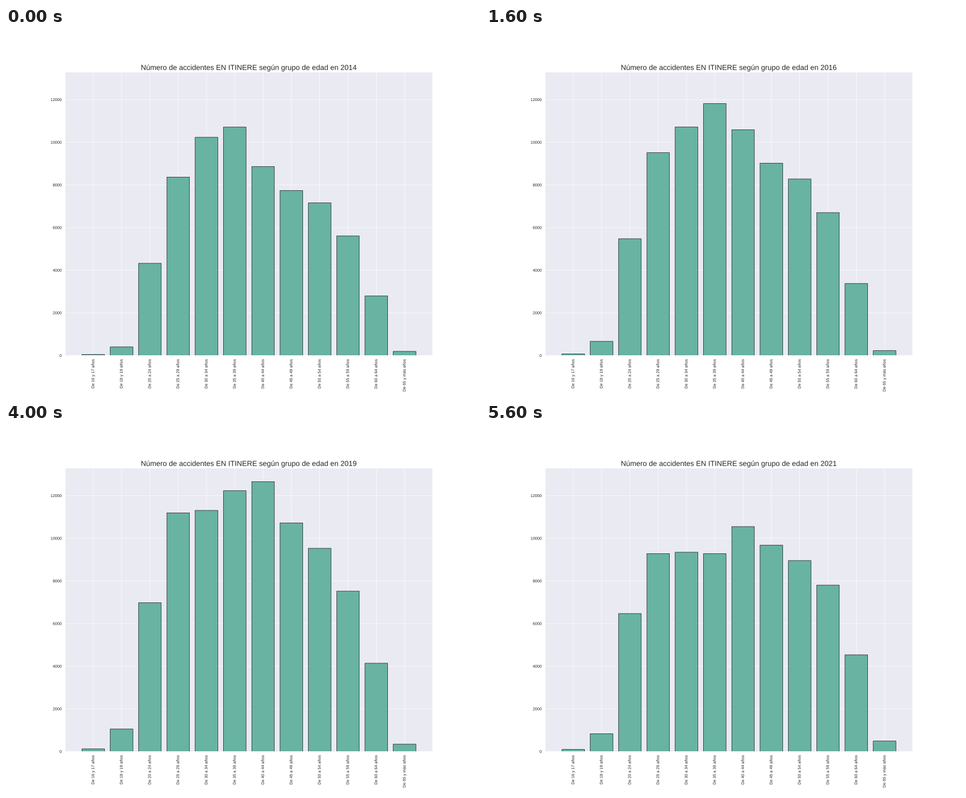
A matplotlib script for the animation above (6.4 s loop, 849 px wide and 660 px high).

```python
import numpy as np
import matplotlib.pyplot as plt
from matplotlib.animation import FuncAnimation
from matplotlib.patheffects import Normal

W, H, DPI = 849, 660, 64
PT = W / 18 / DPI  # point sizes belong to an 18 inch wide page
INK = "#262626"

plt.rcParams.update({
    "font.family": "Liberation Sans",
    "text.hinting": "none",
    "text.color": INK,
    "axes.titlepad": 6 * PT,
})

AGES = (["De 16 y 17 años", "De 18 y 19 años"]
        + [f"De {a} a {a + 4} años" for a in range(20, 65, 5)]
        + ["De 65 y más años"])
GROUP = np.arange(len(AGES))
FIRST, LAST = 2014, 2021
TOP = 12656  # tallest bar of the whole series

# Accidents from 18 years up in the turning-point years
KEY = {
    2014: [405, 4325, 8368, 10235, 10712, 8862, 7740, 7160, 5608, 2796, 195],
    2017: [795, 6052, 10083, 10957, 12367, 11450, 9662, 8837, 7250, 3672, 245],
    2019: [1057, 6978, 11192, 11307, 12230, TOP, 10722, 9530, 7519, 4142, 348],
    2021: [837, 6470, 9282, 9347, 9282, 10548, 9680, 8955, 7803, 4535, 490],
}


def counts(year):
    """Straight trend between key years, with a dip in 2020."""
    row = np.array([np.interp(year, list(KEY), group)
                    for group in zip(*KEY.values())])
    row = np.insert(row, 0, 0.115 * row[0])  # minors: a fixed share of 18-19
    if year == 2020:
        row *= 0.66 + 0.0105 * GROUP  # the young fell most
    return row


fig = plt.figure(figsize=(W / DPI, H / DPI), dpi=DPI, facecolor="white")
ax = fig.add_axes([0.125, 0.11, 0.775, 0.77], facecolor="#EAEAF2")
ax.set_axisbelow(True)
ax.grid(color="white", linewidth=PT, snap=False)
for spine in ax.spines.values():
    spine.set(edgecolor="white", linewidth=1.25 * PT, snap=False)

bars = ax.bar(GROUP, counts(FIRST), width=0.8, color="#69b3a2",
              edgecolor="black", linewidth=PT, snap=False)
ax.set_xticks(GROUP, AGES, rotation=90)
ax.set_yticks(range(0, 12001, 2000))
ax.set_xlim(-0.99, 11.99)
ax.set_ylim(0, TOP * 1.05)
ax.tick_params(length=0, pad=9.5 * PT, labelsize=11 * PT, labelcolor=INK)
title = ax.set_title("", fontsize=20 * PT)

# Outlined glyphs keep sub-pixel spacing at these small sizes
for label in [title, *ax.get_xticklabels(), *ax.get_yticklabels()]:
    label.set_path_effects([Normal()])


def draw(i):
    year = FIRST + i
    title.set_text(f"Número de accidentes EN ITINERE según grupo de edad en {year}")
    for bar, count in zip(bars, counts(year)):
        bar.set_height(count)
    return [title, *bars]


anim = FuncAnimation(fig, draw, frames=LAST - FIRST + 1, interval=800, repeat=True)
plt.show()
```
